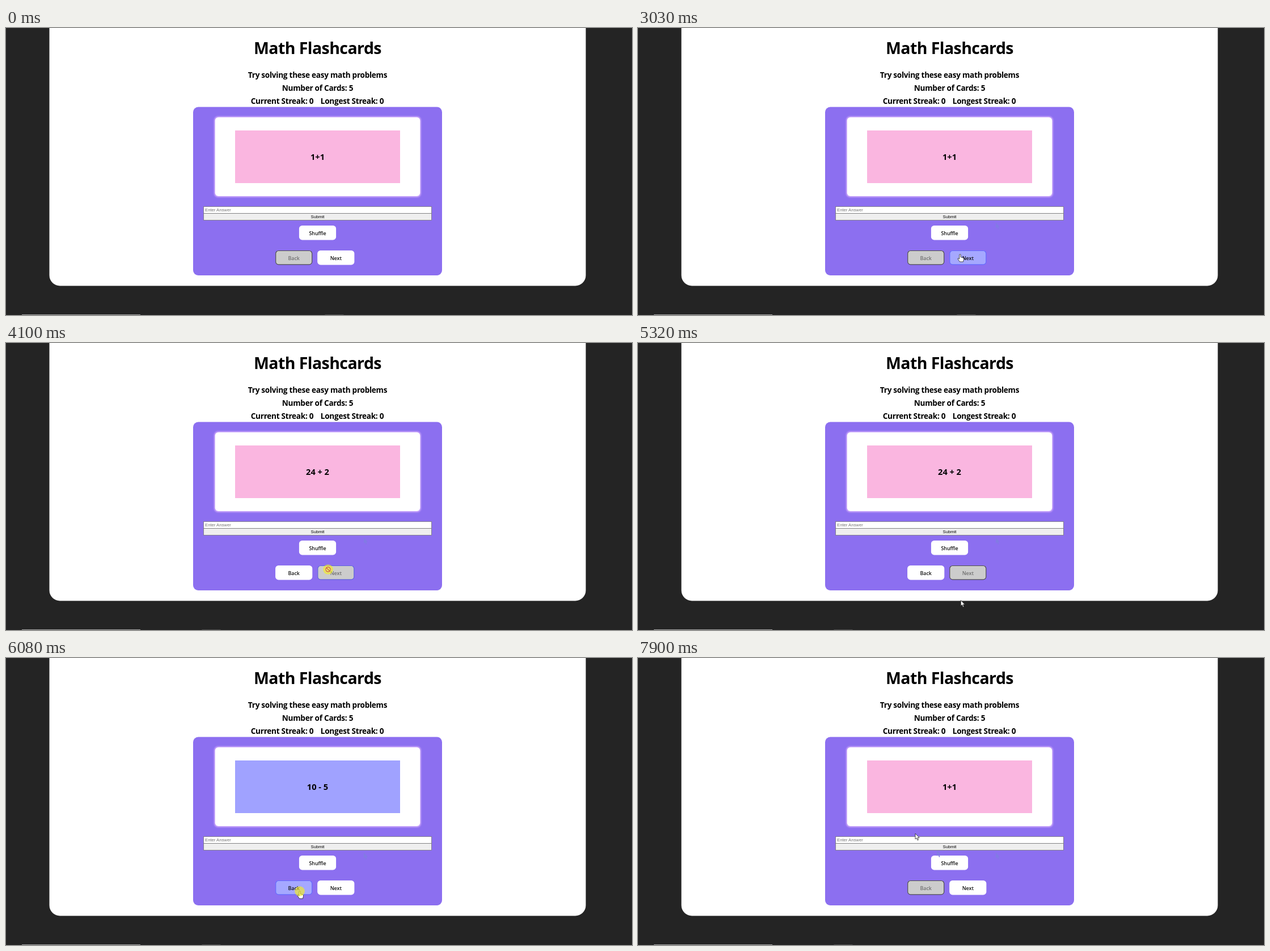
Write an HTML page that moves like this. It is 1104 px wide and 507 px high and loops after 7990 ms.

```html
<!DOCTYPE html>
<html lang="en">
<head>
<meta charset="utf-8">
<title>Math Flashcards</title>
<style>
  html, body { margin: 0; width: 100%; height: 100%; overflow: hidden; background: #242424; }
  svg { display: block; width: 1104px; height: 507px; }
  text { text-anchor: middle; font: 700 13.6px "Open Sans", "Noto Sans", sans-serif; letter-spacing: -.02em; }
  .title { font-size: 28.5px; }
  #sum { font-size: 14.6px; letter-spacing: 0; }
  .btn text { font-size: 8.9px; font-weight: 600; letter-spacing: 0; }
  .form text { font: 7.7px "Liberation Sans", Arial, sans-serif; letter-spacing: 0; }
  .form rect { stroke: #767676; stroke-width: .8; }
</style>
</head>
<body>
<svg viewBox="0 0 1104 507">
  <defs>
    <path id="arrow" d="M0,0V10L2.3,8L4,12L5.6,11.2L4,7.6H7.2Z"/>
    <path id="ban" d="M-3,-3L3,3M-4.2,0a4.2,4.2 0 1 0 8.4,0a4.2,4.2 0 1 0 -8.4,0"/>
    <filter id="glow" x="-10%" y="-10%" width="120%" height="120%"><feGaussianBlur stdDeviation="1.3"/></filter>
  </defs>
  <rect x="76.5" y="-40" width="946" height="495.5" rx="18.5" fill="#fff"/>
  <text class="title" x="549.5" y="45.5">Math Flashcards</text>
  <text x="549.5" y="87.5">Try solving these easy math problems</text>
  <text x="549.5" y="110.5">Number of Cards: 5</text>
  <text x="487" y="133.7">Current Streak: 0</text>
  <text x="610.5" y="133.7">Longest Streak: 0</text>
  <rect x="330" y="139.5" width="439" height="297.5" rx="9" fill="#8c6ff0"/>
  <rect x="367" y="156" width="365" height="143" rx="7" fill="#cba6fb" filter="url(#glow)"/>
  <rect x="368.7" y="157.8" width="361.6" height="139.2" rx="6" fill="#fff"/>
  <rect id="card" x="404" y="181" width="291" height="93"/>
  <text id="sum" x="549.5" y="233.3"></text>
  <g class="form">
    <rect x="348.5" y="315.5" width="402" height="12" fill="#fff"/>
    <rect id="submit" x="348.5" y="327.5" width="402" height="12"/>
    <text x="351" y="324.4" fill="#757575" style="text-anchor:start">Enter Answer</text>
    <text x="549.5" y="336.4">Submit</text>
  </g>
  <g id="buttons"></g>
  <rect x="28" y="506" width="209" height="1" fill="#aaa"/>
  <rect id="bar" y="506" width="33" height="1" fill="#4c4c4c"/>
  <g fill="#827ae4">
    <use id="trail1" href="#arrow" x="631" y="344"/>
    <use id="trail2" href="#arrow" x="527" y="340"/>
  </g>
  <g id="cursor">
    <use id="point" href="#arrow" fill="#fff" stroke="#222" stroke-width=".8"/>
    <path id="hand" fill="#fff" stroke="#222" stroke-width=".8"
      d="M-1.2,.4Q0,-1 1.2,.4V4.8L5,5.8Q7,6.6 6.5,8.8L5.5,13H-.5L-4,8Q-4.2,6.5 -2.6,7L-1.2,8.2Z"/>
    <circle id="click" r="8.8" fill="#f5ec20" opacity=".65"/>
    <g id="deny" fill="none">
      <use href="#ban" stroke="#f6ecc0" stroke-width="2"/>
      <use href="#ban" stroke="#cc5a20" stroke-width="1.2"/>
    </g>
  </g>
</svg>
<script>
const LOOP = 7990, STEP = 70, FADE = 250;
const FORWARD = 3340, BACKWARD = 5870; // first click on Next, on Back
const $ = id => document.getElementById(id);
const pink = '#fab6e0', violet = '#a0a2ff', blue = '#80bfff';
const cards = [['1+1', pink], ['2 * 3', blue], ['10 - 5', violet], ['4 * 4', blue], ['24 + 2', pink]];

// Pointer moves: start and end time, destination, ease-out power
const moves = [
  [390, 530, 851, 244], [790, 1150, 613, 352], [1480, 1970, 568, 400, 4],
  [4900, 5180, 600, 480], [5180, 5670, 518, 412],
  [7090, 7230, 527, 340], [7430, 7560, 506, 279], [7760, 7900, 489, 310]
];

const clamp = (v, lo, hi) => Math.min(hi, Math.max(lo, v));
const between = (t, a, b) => t >= a && t < b;
const show = (id, on) => $(id).style.display = on ? '' : 'none';

// The pointer waits off stage and advances in steps
function tipAt(t) {
  let x = 1125, y = 575;
  for (const [start, end, toX, toY, power = 1] of moves) {
    if (t < start) break;
    const steps = Math.round((end - start) / STEP) + 1;
    const p = Math.min(1, (Math.floor((t - start) / STEP) + 1) / steps);
    const eased = 1 - (1 - p) ** power;
    x += (toX - x) * eased;
    y += (toY - y) * eased;
  }
  return [x, y];
}

const clicks = (t, first, gap) => clamp(Math.floor((t - first) / gap) + 1, 0, 4);
const cardAt = t => clicks(t, FORWARD, 240) - clicks(t, BACKWARD, 180);
const inside = ([px, py], x, y, w, h) => between(px, x, x + w) && between(py, y, y + h);

function makeButton(label, x, y, lockedOn) {
  const w = 64, h = 24.4;
  $('buttons').insertAdjacentHTML('beforeend',
    `<g class="btn"><rect x="${x}" y="${y}" width="${w}" height="${h}" rx="5" stroke-width="1.2"/>
     <text x="${x + w / 2}" y="${y + 16.5}">${label}</text></g>`);
  const [rect, text] = $('buttons').lastElementChild.children;
  const locked = t => cardAt(t) === lockedOn;
  const hover = t => inside(tipAt(t), x, y, w, h);
  const edge = t => locked(t) ? [80, 80, 80] : hover(t) ? [100, 108, 255] : [255, 255, 255];

  // Border colour fades: average it over the recent past
  function border(t) {
    const past = [0, 1, 2, 3, 4].map(k => edge(Math.max(0, t - k * FADE / 5)));
    return `rgb(${[0, 1, 2].map(c => past.reduce((sum, e) => sum + e[c], 0) / past.length)})`;
  }

  return t => {
    const isLocked = locked(t), isHover = hover(t);
    rect.style.fill = isLocked ? '#ccc' : isHover ? '#a5a8ff' : '#fff';
    rect.style.stroke = border(t);
    text.style.fill = isLocked ? '#707070' : '#111';
    return isHover && (isLocked ? 'deny' : 'hand');
  };
}

const buttons = [
  makeButton('Shuffle', 517.5, 349.5),
  makeButton('Back', 475.7, 393.5, 0),
  makeButton('Next', 549.8, 393.5, 4)
];

function draw(t) {
  const [sum, color] = cards[cardAt(t)], tip = tipAt(t);
  $('sum').textContent = sum;
  $('card').style.fill = color;
  $('submit').style.fill = inside(tip, 348, 328, 402, 12) ? '#e5e5e5' : '#efefef';
  $('bar').setAttribute('x', t < FORWARD ? 562.5 : 345.5);

  const shape = buttons.map(paint => paint(t)).find(Boolean) || 'point';
  for (const id of ['point', 'hand', 'deny']) show(id, id === shape);
  show('click', between(t, FORWARD, 4560) || between(t, BACKWARD, 6690));
  show('trail1', t >= 1150);
  show('trail2', t >= 7430);
  $('cursor').setAttribute('transform', `translate(${tip})`);
}

function frame() {
  draw(performance.now() % LOOP);
  requestAnimationFrame(frame);
}
frame();
</script>
</body>
</html>
```
